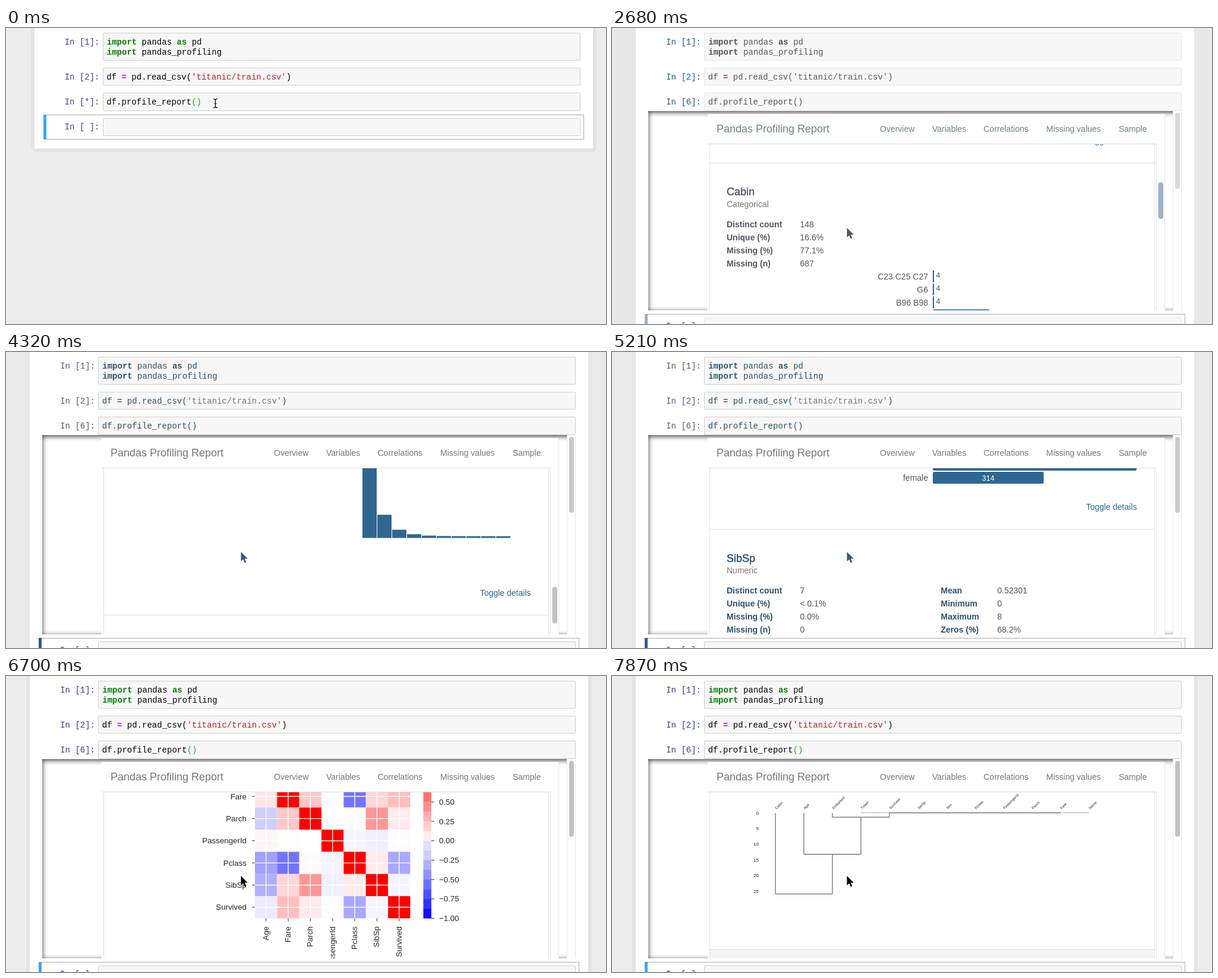
An HTML page for the animation above (8000 ms loop, 1010 by 499 pixels).

```html
<!DOCTYPE html>
<html lang="en">
<head>
<meta charset="utf-8">
<title>Profile report</title>
<style>
html, body { margin: 0; width: 100%; height: 100%; overflow: hidden; background: #ededed; }
svg { display: block; font: 14px "Liberation Sans", Arial, sans-serif; }
.code text { font: 14px "Liberation Mono", monospace; fill: var(--code); white-space: pre; }
.code .prompt { fill: var(--prompt); }
.kw { fill: var(--kw); font-weight: bold; }
.op { fill: var(--op); font-weight: bold; }
.str { fill: var(--str); }
.br { fill: var(--br); }
.cell { fill: #f7f7f7; stroke: var(--edge); }
.nav { fill: var(--nav); }
.report { fill: var(--text); }
.bold { font-weight: bold; fill: var(--bold); }
.head { fill: var(--bold); stroke: var(--bold); }
.sub { fill: #777; }
.bar, .link { fill: var(--bar); }
.chip { font: 12.6px "DejaVu Sans Mono", monospace; fill: #c7254e; }
.badge { font-size: 10.5px; font-weight: bold; fill: #fff; }
.plot { fill: #262626; font-size: 13.3px; }
.line { stroke: #dfdfe2; fill: none; }
.well { height: 336px; box-shadow: inset 0 2px 8px rgba(0,0,0,.8); }
</style>
</head>
<body>
<div id="stage"></div>
<script>
const palettes = {
  vivid: { code: '#000', kw: '#008000', op: '#a2f', str: '#ba2121', br: '#0b0', prompt: '#303f9f',
    edge: '#cfcfcf', accent: '#42a5f5', nav: '#777', text: '#333', bold: '#333', bar: '#337ab7',
    arrow: '#000', thumb: '#c1c1c1', inner: '#c1c1c1', page: '#ededed', band: '#e3e3e3' },
  green: { code: '#555', kw: '#505358', op: '#85509a', str: '#5c5c60', br: '#555', prompt: '#1f5b88',
    edge: '#e6e6e6', accent: '#9bb1c5', nav: '#6c8480', text: '#555', bold: '#555560', bar: '#28629a',
    arrow: '#555560', thumb: '#d9d9d9', inner: '#9bb3c9', page: '#e8e8e8', band: '#e6e6e6' },
  blue: { code: '#2c5068', kw: '#2c5673', op: '#8a40b0', str: '#7a7272', br: '#2c5068', prompt: '#555b70',
    edge: '#cfcfcf', accent: '#2d5f8b', nav: '#777', text: '#50555c', bold: '#2c526f', bar: '#2f6791',
    arrow: '#2c5c84', thumb: '#c9c9c9', inner: '#c1c1c1', page: '#e9e9e9', band: '#e7e7e7' }
};

const text = (x, y, s, attrs = '') => `<text x="${x}" y="${y}" ${attrs}>${s}</text>`;
const rect = (x, y, w, h, attrs = '') => `<rect x="${x}" y="${y}" width="${w}" height="${h}" ${attrs}/>`;
const path = (d, attrs = 'class="line"') => `<path d="${d}" ${attrs}/>`;
const group = (s, attrs) => `<g ${attrs}>${s}</g>`;
const span = (cls, s) => `<tspan class="${cls}">${s}</tspan>`;
const END = 'text-anchor="end"', MID = 'text-anchor="middle"';

/* Report content, in page coordinates with the "Variables" heading at y = 278 */
let y = 278, page = '';
const anchors = {};

function warning(cy, name, note, tag, color) {
  const w = name.length * 7.58;
  return rect(193, cy - 9, w + 8, 18, 'rx="4" fill="#f9f2f4"') + text(196.5, cy + 4, name, 'class="chip"') +
    text(204 + w, cy + 5, note) + rect(517, cy - 8, tag === 'Zeros' ? 40 : 53, 17, `rx="3" fill="${color}"`) +
    text(tag === 'Zeros' ? 537 : 543.5, cy + 4.5, tag, `class="badge" ${MID}`);
}

function heading(title) {
  page += rect(164.5, y, 749, 109.5, 'fill="#f5f5f5" stroke="#dcdce0"') +
    text(192, y + 74.5, title, 'class="head" font-size="36" stroke-width="1.1"');
  y += 109.5;
}

function section(height, body, key) {
  if (key) anchors[key] = y;
  page += group(body, `transform="translate(0 ${y})"`);
  y += height;
  page += path(`M164.5 ${y}H913.5`);
}

const title = s => text(193, 54.5, s, 'class="head" font-size="18" stroke-width=".5"');
const rows = (x, dx, labels, values) => labels.map((s, i) =>
  text(x, 108 + 22 * i, s, 'class="bold"') + text(x + dx, 108 + 22 * i, values[i] ?? '')).join('');
const counts = ['Distinct count', 'Unique (%)', 'Missing (%)', 'Missing (n)'];
const toggle = h => text(883.5, h - 33, 'Toggle details', `class="link" ${END}`);

function numeric(name, left, right, decay) {
  let hist = '';
  for (let i = 0; i < 10; i++) {
    const h = 3 + 120 * Math.exp(-decay * i);
    hist += rect(600 + 25 * i, 350 - h, 24, h, 'class="bar"');
  }
  section(480, title(name) + text(193, 74, 'Numeric', 'class="sub"') +
    rows(193, 123.5, [...counts, 'Infinite (%)', 'Infinite (n)'], [...left, '0.0%', '0']) +
    rows(553.5, 95, ['Mean', 'Minimum', 'Maximum', 'Zeros (%)'], right) + hist + toggle(480), name);
}

function categorical(name, kind, left, bars) {
  const max = Math.max(...bars.map(b => b[1])), h = 256 + 22 * bars.length;
  const chart = bars.map(([label, n], i) => {
    const cy = 191 + 22 * i, w = Math.max(1, 343 * n / max);
    return text(532, cy + 5, label, END) + rect(540, cy - 10, w, 20, `class="bar" rx="${w > 5 ? 2.5 : 0}"`) +
      (w > 50 ? text(540 + w / 2, cy + 4.5, n, `${MID} font-size="12.6" fill="#fff"`)
              : text(543.5 + w, cy + 2.5, n, 'font-size="12.6"'));
  }).join('');
  section(h, title(name) + text(193, 74, kind, 'class="sub"') + rows(193, 123.5, counts, left) + chart + toggle(h), name);
}

const numbers = ['Age', 'Fare', 'Parch', 'PassengerId', 'Pclass', 'SibSp', 'Survived'];
const corr = [
  [.10, -.19, .04, -.37, -.31, -.08], [.22, .01, -.55, .16, .26], [0, .02, .41, .08],
  [-.04, -.06, -.01], [.08, -.34], [-.04]
];
const shade = v => {
  const c = Math.round(255 * (1 - Math.abs(v)));
  return v < 0 ? `rgb(${c},${c},255)` : `rgb(255,${c},${c})`;
};

function heatmap(name, key) {
  const p = 37.35, x0 = 419, y0 = 110, size = 7 * p;
  let s = title(name), grid = '', ticks = '', labels = '';
  numbers.forEach((label, i) => {
    const c = (i + .5) * p;
    numbers.forEach((_, j) => {
      const v = i === j ? 1 : corr[Math.min(i, j)][Math.abs(i - j) - 1];
      s += rect(x0 + j * p, y0 + i * p, p, p, `fill="${shade(v)}"`);
    });
    grid += `M${x0} ${y0 + c}h${size}M${x0 + c} ${y0}v${size}`;
    ticks += `M${x0 - 5} ${y0 + c}h5M${x0 + c} ${y0 + size}v5`;
    s += text(405, y0 + c + 4.5, label, END);
    labels += text(0, 0, label, `${END} transform="translate(${x0 + c + 4} 385) rotate(-90)"`);
  });
  for (let i = 0; i < 16; i++) s += rect(702.5, y0 + i * size / 16, 13.5, size / 16 + .3, `fill="${shade(.9375 - i / 8 + .0625 * (i < 8 ? 1 : -1) * (i % 8 ? 0 : 1))}"`);
  for (let i = 0; i <= 8; i++) {
    const v = 1 - i / 4, ty = y0 + i * size / 8;
    ticks += `M716 ${ty}h5`;
    s += text(729, ty + 4.5, v.toFixed(2).replace('-', '\u2212'));
  }
  section(500, group(s + path(grid, 'stroke="#fff" stroke-width="1.4"') + path(ticks, 'stroke="#333"') +
    group(labels, 'clip-path="url(#labels)"'), 'class="plot"'), key);
}

const columns = ['Age', 'Cabin', 'Embarked', 'Fare', 'Name', 'Parch', 'PassengerId', 'Pclass', 'Sex', 'SibSp', 'Survived', 'Ticket'];

function missingCount() {
  let s = title('Count') + rect(251, 110, 576, 180, 'fill="#e9e9f1"');
  columns.forEach((label, i) => {
    const x = 275 + 48 * i, h = 180 * ([.8, .23][i] ?? 1);
    s += rect(x - 12, 290 - h, 24, h, 'fill="#3077b6"') +
      text(0, 0, label, `${END} transform="translate(${x - 2} 307) rotate(-45)"`);
  });
  for (let i = 0; i <= 5; i++)
    s += text(240, 294.5 - 36 * i, (i / 5).toFixed(1), END) + text(838, 294.5 - 36 * i, i < 5 ? 178 * i : 891);
  section(426, group(s, 'class="plot" style="font-size:13px"'), 'count');
}

function missingMatrix() {
  let s = title('Matrix'), seed = 7;
  const random = () => (seed = seed * 16807 % 2147483647) / 2147483647;
  columns.forEach((label, i) => {
    const x = 253 + 48 * i;
    s += rect(x, 130, 44, 230, 'fill="#404040"') + text(0, 0, label, `transform="translate(${x + 22} 124) rotate(45) scale(-1)"`.replace('rotate(45) scale(-1)', 'rotate(-45)'));
    let gaps = '';
    for (let k = 0; k < 230 && i < 2; k++) if (random() < [.2, .77][i]) gaps += `M${x} ${130.5 + k}h44`;
    s += path(gaps, 'stroke="#fff"');
  });
  section(426, group(s, 'class="plot" style="font-size:10px"'));
}

function dendrogram() {
  const names = ['Cabin', 'Age', 'Embarked', 'Ticket', 'Survived', 'SibSp', 'Sex', 'Pclass', 'PassengerId', 'Parch', 'Fare', 'Name'];
  let s = names.map((n, i) => text(0, 0, n, `font-size="6" transform="translate(${277 + 48 * i} 120) rotate(-45)"`)).join('');
  for (let i = 0; i < 6; i++) s += text(247, 128.5 + 26.4 * i, 5 * i, `${END} font-size="8"`);
  s += path('M275 126V262.5H371V195.5M323 126V195.5H419V133M371 126V133H467V126', 'fill="none" stroke="#333" stroke-width=".9"') +
    path('M467 125.7H755', 'stroke="#222" stroke-width=".9"') +
    path('M419 125.7H467M755 125.7H803', 'stroke="#888" stroke-width=".7"');
  section(356, group(s, 'fill="#222"'), 'tree');
}

page += warning(200, 'Parch', 'has 678 (76.1%) zeros', 'Zeros', '#5bc0de') +
  warning(220, 'SibSp', 'has 608 (68.2%) zeros', 'Zeros', '#5bc0de') +
  warning(240, 'Ticket', 'has a high cardinality: 681 distinct values', 'Warning', '#f0ad4e');
heading('Variables');
const few = n => [n, '&lt; 0.1%', '0.0%', '0'];
numeric('Age', [89, '10.0%', '19.9%', 177], ['29.699', '0.42', '80', '0.0%'], .2);
categorical('Cabin', 'Categorical', [148, '16.6%', '77.1%', 687],
  [['C23 C25 C27', 4], ['G6', 4], ['B96 B98', 4], ['Other values (144)', 192], ['(Missing)', 687]]);
categorical('Embarked', 'Categorical', [4, '&lt; 0.1%', '&lt; 0.1%', 2],
  [['S', 644], ['C', 168], ['Q', 77], ['(Missing)', 2]]);
numeric('Fare', [248, '27.8%', '0.0%', '0'], ['32.204', '0', '512.33', '1.7%'], 1.4);
categorical('Name', 'Categorical, Unique', [891, '100.0%', '0.0%', '0'], []);
numeric('Parch', few(7), ['0.38159', '0', '6', '76.1%'], 1.2);
numeric('PassengerId', [891, '100.0%', '0.0%', '0'], ['446', '1', '891', '0.0%'], 0);
numeric('Pclass', few(3), ['2.3086', '1', '3', '0.0%'], .1);
categorical('Sex', 'Categorical', few(2), [['male', 577], ['female', 314]]);
numeric('SibSp', few(7), ['0.52301', '0', '8', '68.2%'], 1);
categorical('Survived', 'Boolean', few(2), [['0', 549], ['1', 342]]);
categorical('Ticket', 'Categorical', [681, '76.4%', '0.0%', '0'],
  [['CA. 2343', 7], ['347082', 7], ['1601', 7], ['Other values (678)', 870]]);
heading('Correlations');
heatmap("Pearson's r", 'corr');
heatmap("Spearman's \u03c1");
heading('Missing values');
missingCount();
missingMatrix();
dendrogram();
heading('Sample');

/* Notebook */
const cell = (top, h) => rect(163.5, top, 803, h, 'class="cell" rx="1.5"');
const prompt = (base, s, attrs = '') => text(98.7, base, s, `class="prompt" ${attrs}`);
const emptyCell = rect(63.5, 146.5, 909, 41, 'fill="#fff" stroke="#ababab"') +
  rect(63, 146, 5, 42, 'fill="var(--accent)"') + cell(152.5, 29) + prompt(171, 'In [ ]:');
const source = prompt(28, 'In [1]:') + prompt(87, 'In [2]:') + prompt(129, '', 'id="run"') +
  text(169.8, 28, span('kw', 'import') + ' pandas ' + span('kw', 'as') + ' pd') +
  text(169.8, 45, span('kw', 'import') + ' pandas_profiling') +
  text(169.3, 87, 'df ' + span('op', '=') + ' pd.read_csv(' + span('str', "'titanic/train.csv'") + ')') +
  text(169.3, 129, 'df.profile_report' + span('br', '()'));

const nav = rect(161, 145, 756, 50.5, 'fill="#fff"') + path('M161 195.5H917') +
  text(176, 176, 'Pandas Profiling Report', 'font-size="18"') +
  [['Overview', 451], ['Variables', 539], ['Correlations', 625.5], ['Missing values', 731], ['Sample', 853]]
    .map(([s, x]) => text(x, 175, s)).join('');

const output = '<foreignObject x="61" y="140" width="898" height="336"><div class="well"></div></foreignObject>' +
  rect(161, 145, 770, 331, 'fill="#fff"') + rect(944, 140, 15, 336, 'fill="#fff"') +
  group(group(path('M164.5 0V9999M913.5 0V9999') + page, 'id="page"'), 'class="report" clip-path="url(#view)"') +
  path('M916.5 145V476M930.5 145V476M944.5 140V476M958.5 140V476', 'stroke="#e6e6e6"') +
  group(nav, 'class="nav"') +
  group(rect(919.5, 209, 8.5, 62, 'id="inner" rx="4.2" fill="var(--inner)"'), 'clip-path="url(#frame)"') +
  rect(948, 143, 8, 128, 'rx="4" fill="var(--thumb)"');

document.getElementById('stage').innerHTML = `<svg width="1010" height="499" viewBox="0 0 1010 499">
  <defs>
    <clipPath id="view">${rect(161, 196, 756, 280)}</clipPath>
    <clipPath id="frame">${rect(917, 145, 14, 331)}</clipPath>
    <clipPath id="labels">${rect(400, 380, 300, 68)}</clipPath>
  </defs>` +
  rect(0, 0, 1010, 499, 'fill="var(--page)"') +
  group(rect(42, -20, 952, 229, 'id="band" rx="8" fill="var(--band)"') +
    rect(48, -20, 940, 223, 'id="paper" fill="#fff"') +
    cell(8.5, 46) + cell(67.5, 29) + cell(109.5, 30) + group(emptyCell, 'id="empty"'), 'id="boxes" class="code"') +
  group(source, 'id="source" class="code"') + group(output, 'id="output"') +
  path('M349 119.5q3 0 3.5 2q.5-2 3.5-2M352.5 121V133M350.5 127.5H354.5M349 134.5q3 0 3.5-2q.5 2 3.5 2', 'id="beam" fill="none" stroke="#000" stroke-width="1.2"') +
  path('M0 0V16L3.7 12.5L6.3 18.4L8.9 17.3L6.4 11.6H11.4Z', 'id="arrow" fill="var(--arrow)" stroke="#fff" stroke-width="1.2" paint-order="stroke"') +
  '</svg>';

/* Timeline: hard steps of [time, scroll offset] */
const embarked = anchors.Embarked - 89, sibsp = anchors.SibSp - 299,
  corrTop = anchors.corr - 17, countTop = anchors.count - 21, treeTop = anchors.tree - 105;
const scrolls = [
  [1180, 0], [1780, 130], [2080, 380], [2230, 560], [2680, 640], [2980, 800], [3130, 960], [3430, embarked - 54],
  [3580, embarked], [3880, 1500], [4020, 1950], [4320, 2350], [4470, 2800], [4760, 3250], [5210, sibsp],
  [5500, sibsp + 420], [5650, sibsp + 900], [5950, corrTop - 100], [6100, corrTop], [6250, corrTop + 110],
  [6400, corrTop + 300], [6700, corrTop + 480], [6840, corrTop + 800], [7140, countTop], [7280, countTop + 150],
  [7580, countTop + 400], [7720, treeTop - 120], [7870, treeTop]
];
const pointer = [[0, [352, 119]], [290, [480, 280]], [440, [579, 391]], [1180, [395.5, 337]]];
const moods = [[0, 'vivid'], [2680, 'green'], [3880, 'blue'], [5500, 'vivid']];
const at = (steps, t) => steps.reduce((value, [start, v]) => t >= start ? v : value, steps[0][1]);

const el = id => document.getElementById(id);
const svg = document.querySelector('svg');
const move = (id, x, y) => el(id).setAttribute('transform', `translate(${x} ${y})`);
const show = (id, on) => el(id).setAttribute('visibility', on ? 'visible' : 'hidden');

function draw(t) {
  const done = t >= 1180, scroll = at(scrolls, t);
  for (const [name, color] of Object.entries(palettes[at(moods, t)])) svg.style.setProperty('--' + name, color);
  move('boxes', done ? -8 : 0, 0);
  move('source', done ? -7.5 : 0, 0);
  move('empty', 0, done ? 336 : 0);
  el('band').setAttribute('height', done ? 560 : 229);
  el('paper').setAttribute('height', done ? 560 : 223);
  el('run').textContent = done ? 'In [6]:' : 'In [*]:';
  el('output').style.display = done ? '' : 'none';
  move('page', 0, -scroll);
  move('inner', 0, scroll * 91 / embarked);
  show('beam', t < 290);
  show('arrow', t >= 290);
  move('arrow', ...at(pointer, t));
}

const start = performance.now();
function tick() {
  draw((performance.now() - start) % 8000);
  requestAnimationFrame(tick);
}
tick();
</script>
</body>
</html>
```
